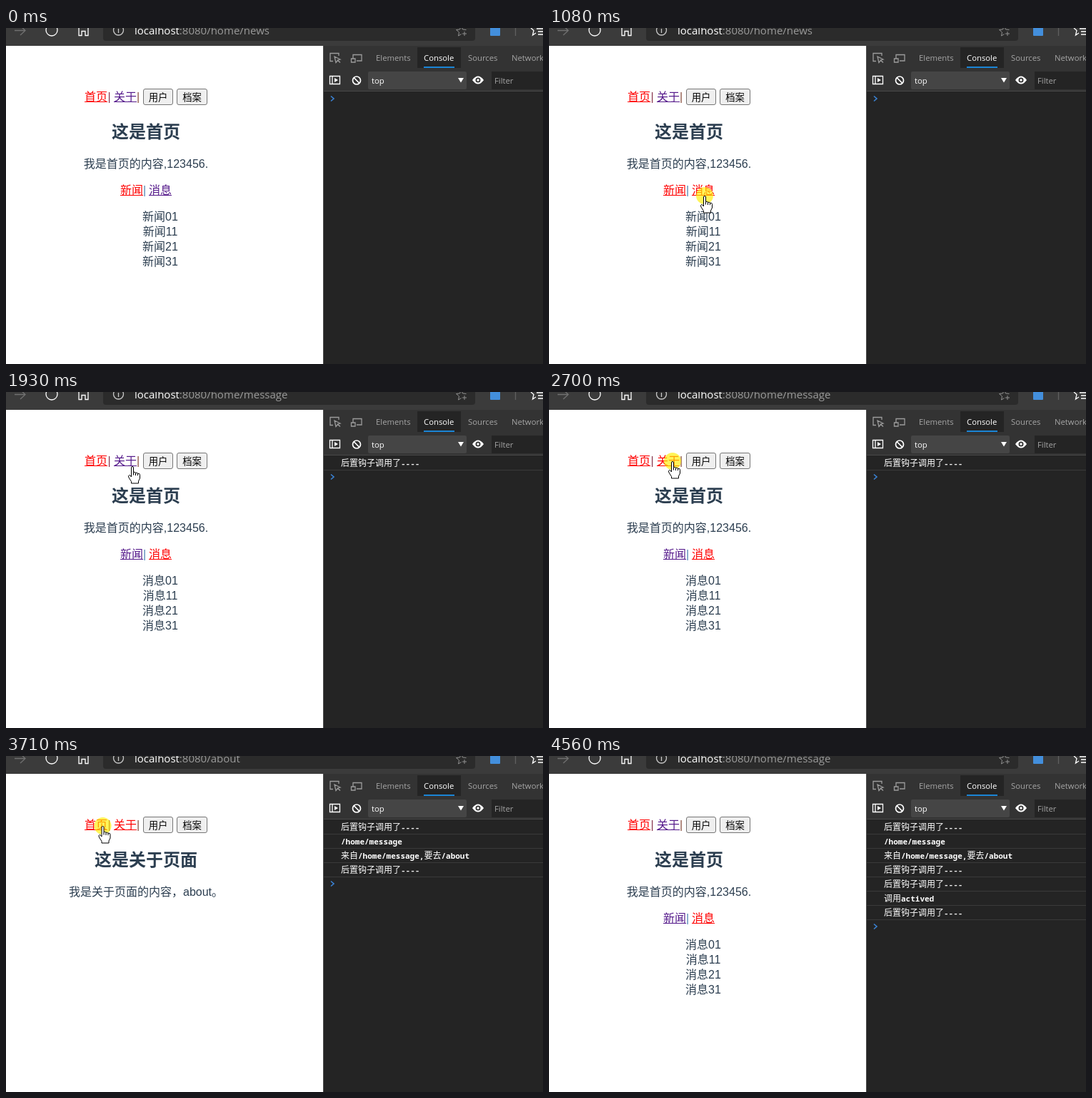
Write an HTML page that moves like this. It is 752 by 471 pixels and loops after 5190 ms.

```html
<!DOCTYPE html>
<html lang="zh-CN">
<head>
<meta charset="utf-8">
<title>Router hooks demo</title>
<style>
html, body { margin: 0; height: 100%; overflow: hidden; background: #fff; }
svg { display: block; width: 100vw; height: 100vh; }
text { white-space: pre; }
.page { font: 16px "Liberation Sans", "Noto Sans CJK SC", "Noto Sans CJK JP", sans-serif; fill: #2c3e50; }
.mid { text-anchor: middle; }
.title { font-size: 24px; font-weight: bold; }
.button { font-size: 13.33px; fill: #000; }
.ui { font: 11.3px "Open Sans", sans-serif; fill: #a5a5a5; }
.ui .on { fill: #fff; }
.url { font: 15px "Open Sans", sans-serif; fill: #9a9a9a; }
.log { font: 12px "Noto Sans CJK SC", "Noto Sans CJK JP", sans-serif; fill: #fff; }
.mono { font: bold 11px "Noto Sans Mono", "DejaVu Sans Mono", monospace; }
.icon { fill: none; stroke: #c8c8c8; stroke-width: 1.3; }
</style>
</head>
<body>
<svg viewBox="0 0 752 471">
  <!-- browser bar -->
  <rect width="752" height="25" fill="#3b3b3b"/>
  <rect x="136" y="-15" width="521" height="33" rx="4" fill="#2b2b2b"/>
  <g class="icon">
    <path d="M12 3.5H27M20-3L27 3.5 20 10" stroke="#707070"/>
    <circle cx="64" cy="3" r="8" stroke="#fff"/>
    <path d="M102 0V10.500H106V4.500H111V10.500H115V0" stroke="#fff"/>
    <circle cx="157.500" cy="3" r="7"/>
    <path d="M157.500 1V7"/>
    <path d="M637.500 8.500L633.500 11 634.500 6 630.500 2.500 635.500 2 637.500-3 639.500 2 644.500 2.500M639 8H645M642 5V11" stroke="#909090" stroke-width="1"/>
    <path d="M713.500 0V11" stroke="#606060"/>
    <path d="M735 0L739 3.500 737.500 10 742 7M743 1H752M745 5H752M745 9H752" stroke="#fff"/>
  </g>
  <rect x="678" y="-2" width="14" height="13" rx="1" fill="#438fdc"/>

  <!-- developer tools -->
  <rect x="444" y="25" width="308" height="446" fill="#242424"/>
  <rect x="445" y="25" width="307" height="63" fill="#333"/>
  <path d="M444.500 25V471M445 88.500H752" stroke="#484848"/>
  <rect x="576" y="27" width="61" height="29" fill="#242424"/>
  <rect x="585" y="54" width="43" height="2" fill="#1a85d6"/>
  <rect x="507" y="61" width="138" height="25" rx="2" fill="#454545"/>
  <rect x="680" y="61" width="72" height="25" fill="#242424"/>
  <g class="ui">
    <text x="518" y="46">Elements</text>
    <text x="585" y="46" class="on">Console</text>
    <text x="647" y="46">Sources</text>
    <text x="708" y="46">Network</text>
    <text x="512" y="78" class="on">top</text>
    <text x="684" y="78">Filter</text>
  </g>
  <path d="M633 70H641L637 76.500Z" fill="#fff"/>
  <g class="icon">
    <path d="M466 39V35.500H454V46.500H458M460 40L468 44 464.500 45 468 48.500 464.500 45.500 462 48.500Z" stroke="#9c9c9c"/>
    <path d="M486 43V37.500H498V46H491M483.500 43H489V48H483.500Z" stroke="#9c9c9c"/>
    <path d="M453.500 67.500H467.500V78.500H453.500ZM457 67V79" stroke="#fff"/>
    <path d="M460 70L465 73 460 76Z" fill="#fff" stroke="none"/>
    <g stroke="#fff" stroke-width="1.700"><circle cx="491" cy="73.500" r="5.500"/><path d="M487 69.500L495 77.500"/></g>
  </g>
  <path d="M653 73Q661 62 669 73 661 84 653 73Z" fill="#fff"/>
  <circle cx="661" cy="73" r="3.500" fill="#333"/>
  <circle cx="661" cy="73" r="1.700" fill="#fff"/>
  <g id="live"></g>
</svg>
<script>
const LOOP = 5190;
const RED = '#f00', VISITED = '#551a8b';
const logs = ['后置钩子调用了----', '/home/message', '来自/home/message,要去/about',
  '后置钩子调用了----', '后置钩子调用了----', '调用actived', '后置钩子调用了----'];

// Each track holds [start time, value...]
const views = [[0, 'news'], [1540, 'message'], [2860, 'about'], [3870, 'message']];
const urls = [[0, 'home/news'], [1600, 'home/message'], [2930, 'about'], [3940, 'home/message']];
const counts = [[0, 0], [1540, 1], [2860, 4], [3870, 5], [3940, 7]];
const presses = [[0, ''], [1080, '消息'], [1150, ''], [2700, '关于'], [2860, ''], [3710, '首页'], [3870, '']];
const rings = [[0, 0], [1080, 1], [1230, 0], [2700, 1], [2860, 0], [3710, 1], [3870, 0]];
const moves = [
  [0, 'none', 0, 0],
  [130, 'arrow', 578, 429], [200, 'arrow', 503, 392], [280, 'arrow', 410, 345], [360, 'arrow', 326, 305],
  [440, 'arrow', 267, 278], [510, 'arrow', 234, 262], [590, 'arrow', 220, 256],
  [680, 'arrow', 217, 255], [760, 'arrow', 217, 248], [840, 'arrow', 218, 240], [920, 'hand', 218, 235],
  [1370, 'arrow', 214, 212], [1460, 'beam', 205.5, 183.5], [1540, 'beam', 199.5, 160.5], [1600, 'beam', 194.5, 143.5],
  [1680, 'beam', 189.5, 130.5], [1760, 'arrow', 185, 119], [1840, 'arrow', 181, 111],
  [1930, 'hand', 177, 104], [2000, 'hand', 174, 100], [2070, 'hand', 173, 97],
  [3260, 'beam', 151.5, 98.5], [3310, 'beam', 146.5, 98.5], [3380, 'hand', 140, 98],
  [3460, 'hand', 137, 98], [3540, 'hand', 135.5, 98],
  [4180, 'arrow', 150, 112], [4260, 'arrow', 215, 175], [4340, 'arrow', 330, 270],
  [4410, 'arrow', 500, 380], [4480, 'arrow', 659, 455], [4560, 'none', 0, 0]
];
const pointers = {
  none: '',
  arrow: '<path d="M.5 .5V16L4 12.700 6.300 18.300 8.700 17.300 6.400 11.800H11.300Z" fill="#fff" stroke="#000"/>',
  hand: '<path d="M-1.500 15V2Q-1.500.5 0 .5T1.500 2V8.500Q3 7.500 4.500 9.300 6 8.500 7.500 10.200 10.500 9.600 10.500 12.200V17L8.500 21V24H-1.500V21.500L-5 16Q-6.500 13-4.500 12.500-3 12.500-1.500 15ZM1.500 8.500V12.500M4.500 9.300V13M7.500 10.200V13.200" fill="#fff" stroke="#000"/>',
  beam: '<path d="M-3-8H-1L0-7 1-8H3M0-7V7M-3 8H-1L0 7 1 8H3" fill="none" stroke="#000"/>'
};

const at = (track, t) => track.findLast(step => step[0] <= t).slice(1);
const text = (x, y, s, cls = '', style = '') => `<text x="${x}" y="${y}" class="${cls}" style="${style}">${s}</text>`;
const rect = (x, y, w, h, fill, more = '') => `<rect x="${x}" y="${y}" width="${w}" height="${h}" fill="${fill}" ${more}/>`;

function button(x, w, label) {
  return rect(x + .5, 85.5, w - 1, 22, '#efefef', 'stroke="#767676" rx="2.500"') +
    text(x + w / 2, 102, label, 'mid button');
}

function page(view, pressed) {
  const about = view === 'about';
  const link = (x, y, label, active) => {
    const fill = active || pressed === label ? RED : VISITED;
    return text(x, y, label, '', 'fill:' + fill) + rect(x, y + 1, 32, 1, fill);
  };
  let out = link(110, 102, '首页', !about) + link(151, 102, '关于', about) +
    text(142.5, 102, '|', '', 'fill:#8a3a50') + text(183, 102, '|', '', 'fill:#8a5040') +
    button(192, 42, '用户') + button(239, 43, '档案') +
    text(196, 154, about ? '这是关于页面' : '这是首页', 'mid title') +
    (about ? text(88, 196, '我是关于页面的内容，about。') : text(196, 196, '我是首页的内容,123456.', 'mid'));
  if (!about) {
    const name = view === 'news' ? '新闻' : '消息';
    out += link(160, 233, '新闻', view === 'news') + link(200, 233, '消息', view === 'message') +
      text(192, 233, '|', '', 'fill:#4f86b5');
    for (let i = 0; i < 4; i++) out += text(216, 270 + 21 * i, name + i + 1, 'mid');
  }
  return `<g class="page">${out}</g>`;
}

function log(count) {
  let out = '';
  for (let i = 0; i < count; i++) {
    const line = logs[i].replace(/[ -~]+/g, s => `<tspan class="mono">${s}</tspan>`);
    out += text(469, 104 + 20 * i, line, 'log') + rect(445, 109 + 20 * i, 307, 1, '#3a3a3a');
  }
  const y = 99 + 20 * count;
  return out + `<path d="M455 ${y - 3.5}L459 ${y}L455 ${y + 3.5}" fill="none" stroke="#3b83d6" stroke-width="1.600"/>`;
}

function scene(t) {
  const [kind, x, y] = at(moves, t);
  const ring = at(rings, t)[0] ? `<circle cx="${x}" cy="${y}" r="12" fill="#fe0" opacity=".65"/>` : '';
  return text(180, 9, `<tspan fill="#fff">localhost</tspan>:8080/${at(urls, t)[0]}`, 'url') +
    page(at(views, t)[0], at(presses, t)[0]) + log(at(counts, t)[0]) + ring +
    `<g transform="translate(${x} ${y})">${pointers[kind]}</g>`;
}

const live = document.getElementById('live');
let shown = '';
function draw() {
  const next = scene(performance.now() % LOOP);
  if (next !== shown) live.innerHTML = shown = next;
  requestAnimationFrame(draw);
}
draw();
</script>
</body>
</html>
```
